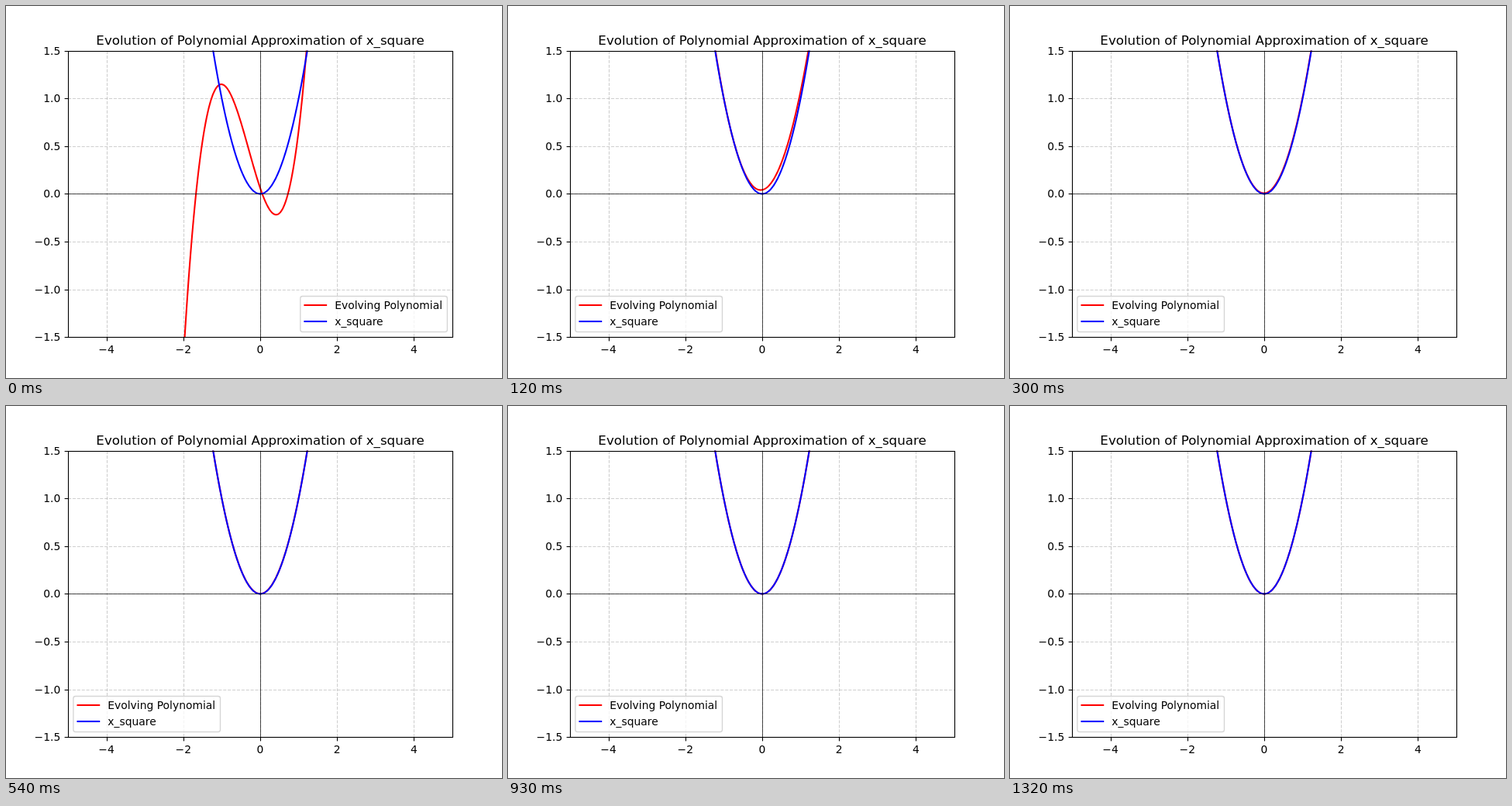
Animation of 640 by 480 pixels, one loop 1500 ms. Source, as an HTML page with a canvas:

```html
<!DOCTYPE html>
<html lang="en">
<head>
<meta charset="utf-8">
<title>Polynomial approximation</title>
<style>
html, body { margin: 0; width: 640px; height: 480px; overflow: hidden; background: #fff; }
canvas { display: block; }
</style>
</head>
<body>
<canvas id="stage" width="640" height="480"></canvas>
<script>
const ctx = document.getElementById('stage').getContext('2d');
const LOOP = 1500, STEP = 30;
const POINT = 100 / 72;
const box = { left: 80, top: 57.6, right: 576, bottom: 427.2 };
const toX = x => 328 + x * 49.6;
const toY = y => 242.4 - y * 123.2;
const snap = v => Math.floor(v + 0.5) + 0.5;

const xTicks = [-4, -2, 0, 2, 4];
const yTicks = [-1.5, -1, -0.5, 0, 0.5, 1, 1.5];

// Deviation from x² at chosen steps: cubic, square, linear, constant.
const keys = [
  { step: 0, dev: [0.943, -0.156, -1.185, 0.061] },
  { step: 1, dev: [-0.227, -0.32, 0.174, 0.069] },
  { step: 4, dev: [-0.0435, -0.002, 0.08, 0.042] },
  { step: 10, dev: [-0.006, -0.0008, 0.012, 0.008] },
  { step: 18, dev: [-0.001, -0.0002, 0.002, 0.002] },
  { step: 31, dev: [-0.0001, -0.0001, 0.0002, 0.0002] },
  { step: 44, dev: [-0.00001, -0.00001, 0.00001, 0.00001] }
];

function deviationAt(step) {
  if (step === 0) return keys[0].dev;
  const next = keys.findIndex(k => k.step > step);
  if (next < 0) return keys[keys.length - 1].dev;
  const from = keys[next - 1], to = keys[next];
  const t = (step - from.step) / (to.step - from.step);
  return from.dev.map((v, i) => v * Math.pow(to.dev[i] / v, t));
}

function line(x1, y1, x2, y2, color, width) {
  ctx.strokeStyle = color;
  ctx.lineWidth = width;
  ctx.beginPath();
  ctx.moveTo(x1, y1);
  ctx.lineTo(x2, y2);
  ctx.stroke();
}

function label(text, x, y, align, points = 10) {
  ctx.font = `${points * POINT}px "DejaVu Sans", sans-serif`;
  ctx.textAlign = align;
  ctx.fillStyle = '#000';
  ctx.fillText(text, x, y);
}

const signed = (v, digits) => v.toFixed(digits).replace('-', '\u2212');

function drawGrid() {
  const color = 'rgba(176,176,176,0.6)', width = 0.8 * POINT;
  ctx.setLineDash([3.7 * width, 1.6 * width]);
  for (const x of xTicks) line(snap(toX(x)), box.bottom, snap(toX(x)), box.top, color, width);
  for (const y of yTicks) line(box.left, snap(toY(y)), box.right, snap(toY(y)), color, width);
  ctx.setLineDash([]);
}

function drawCurve(fn, color) {
  ctx.strokeStyle = color;
  ctx.lineWidth = 1.5 * POINT;
  ctx.lineJoin = 'round';
  ctx.beginPath();
  for (let i = 0; i <= 1000; i++) {
    const x = -5 + i / 100;
    ctx.lineTo(toX(x), toY(fn(x)));
  }
  ctx.stroke();
}

function drawPlot(step) {
  const [a, b, c, d] = deviationAt(step);
  ctx.save();
  ctx.beginPath();
  ctx.rect(box.left, box.top, box.right - box.left, box.bottom - box.top);
  ctx.clip();
  drawGrid();
  drawCurve(x => ((a * x + 1 + b) * x + c) * x + d, '#f00');
  drawCurve(x => x * x, '#00f');
  line(box.left, 242.5, box.right, 242.5, '#000', 0.5 * POINT);
  line(328.5, box.bottom, 328.5, box.top, '#000', 0.5 * POINT);
  ctx.restore();
}

function drawFrame() {
  const width = 0.8 * POINT;
  ctx.strokeStyle = '#000';
  ctx.lineWidth = width;
  ctx.strokeRect(80.5, 58.5, 496, 369);
  for (const x of xTicks) {
    line(snap(toX(x)), 427.5, snap(toX(x)), 432.4, '#000', width);
    label(signed(x, 0), toX(x), 448, 'center');
  }
  for (const y of yTicks) {
    line(75.6, snap(toY(y)), 80.5, snap(toY(y)), '#000', width);
    label(signed(y, 1), 70.3, Math.round(toY(y) + 5), 'right');
  }
  label('Evolution of Polynomial Approximation of x_square', 328, 50, 'center', 12);
}

function drawLegend(left) {
  ctx.beginPath();
  ctx.roundRect(left, 374.5, 189.6, 46, 2.8);
  ctx.fillStyle = 'rgba(255,255,255,0.8)';
  ctx.fill();
  ctx.strokeStyle = 'rgba(204,204,204,0.8)';
  ctx.lineWidth = POINT;
  ctx.stroke();
  ctx.lineCap = 'square';
  line(left + 5.6, 386, left + 33.3, 386, '#f00', 1.5 * POINT);
  line(left + 5.6, 407, left + 33.3, 407, '#00f', 1.5 * POINT);
  ctx.lineCap = 'butt';
  label('Evolving Polynomial', left + 44.4, 391, 'left');
  label('x_square', left + 44.4, 412, 'left');
}

function draw() {
  const step = Math.floor((performance.now() % LOOP) / STEP);
  ctx.fillStyle = '#fff';
  ctx.fillRect(0, 0, 640, 480);
  drawPlot(step);
  drawFrame();
  drawLegend(step === 0 ? 379.8 : 86.9);
  requestAnimationFrame(draw);
}
draw();
</script>
</body>
</html>
```
